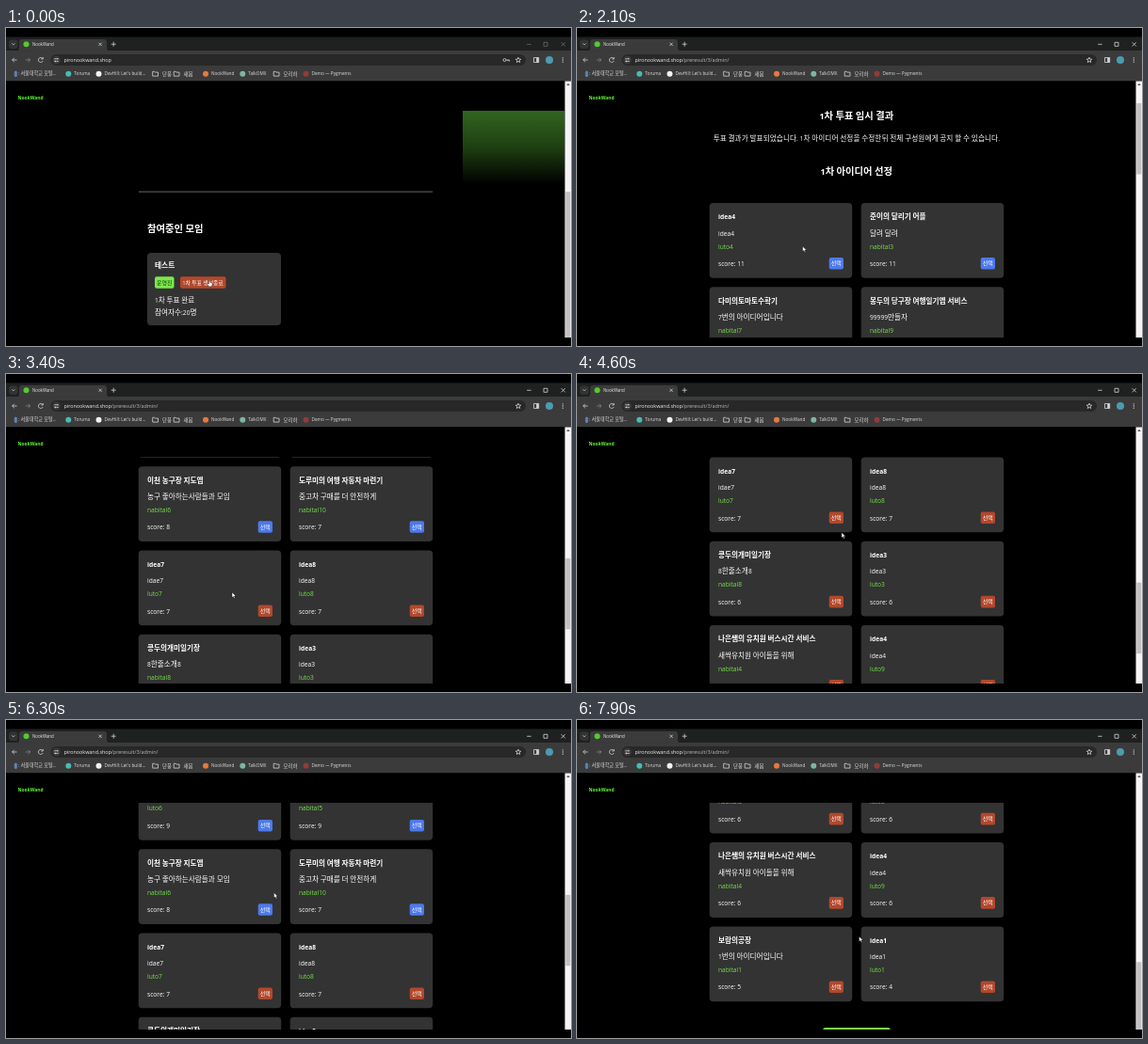
These frames come from a looping animation (600 px wide and 338 px high, 8 s). An HTML page:

```html
<!DOCTYPE html>
<html lang="ko">
<head>
<meta charset="utf-8">
<style>
html, body { margin: 0; height: 100%; overflow: hidden; background: #000; }
svg { display: block; width: 100vw; height: 100vh; font-family: "Open Sans", "Noto Sans CJK KR", "Noto Sans CJK", sans-serif; font-weight: 500; }
.line { fill: none; stroke: #d4d4d4; stroke-width: .8; }
</style>
</head>
<body>
<svg id="stage" viewBox="0 0 600 338">
  <defs>
    <linearGradient id="glow" x2="0" y2="1">
      <stop stop-color="#32651f"/><stop offset=".5" stop-color="#1e3f11"/><stop offset="1" stop-color="#000"/>
    </linearGradient>
    <clipPath id="view"><path d="M0 88H593V329H0z"/></clipPath>
    <clipPath id="bar"><path d="M593 56.5H600V329H593z"/></clipPath>
  </defs>
  <rect width="600" height="338"/>
  <g clip-path="url(#view)"><g id="home"></g><g id="result"></g></g>
  <g id="chrome"></g>
  <g clip-path="url(#bar)">
    <path fill="#f4f4f4" d="M593.5 56H600V329H593.5z"/>
    <path fill="#555" d="M595.2 61L597 58.8L598.8 61z"/>
    <rect id="thumb" x="594.3" width="5" fill="#c1c1c1"/>
  </g>
  <path id="arrow" d="M0 0V5.6L1.4 4.4L2.4 6.6L3.3 6.2L2.4 4.1H4.1z" fill="#fff" stroke="#000" stroke-width=".4"/>
  <path id="hand" d="M-.6 0Q0-.8.6 0V2.2L3 2.8V5Q2.6 6.6 1.8 6.8H-.8L-2.4 4Q-2 3.2-.6 4z" fill="#fff" stroke="#000" stroke-width=".4"/>
</svg>
<script>
const $ = id => document.getElementById(id);
const GREEN = '#7be84b', BLUE = '#4d79ea', RED = '#b2482c';
const BOLD = 'font-weight="700"', MID = 'text-anchor="middle"', HEAD = `${BOLD} ${MID}`;

const rect = (x, y, w, h, fill, r = 0) =>
  `<rect x="${x}" y="${y}" width="${w}" height="${h}" rx="${r}" fill="${fill}"/>`;
const dot = (x, y, r, fill) => `<circle cx="${x}" cy="${y}" r="${r}" fill="${fill}"/>`;
const line = d => `<path class="line" d="${d}"/>`;

// y is the vertical middle; Hangul is set a little larger than Latin
function text(x, y, str, size = 6.65, fill = '#fff', attrs = '') {
  const body = str.replace(/[가-힣]+/g, m => `<tspan font-size="${size * 1.15}">${m}</tspan>`);
  return `<text x="${x}" y="${y + size * .36}" font-size="${size}" fill="${fill}" ${attrs}>${body}</text>`;
}

// Landing page
$('home').innerHTML =
  rect(485, 88, 108, 78, 'url(#glow)') +
  rect(141, 173.6, 312, .9, '#777') +
  text(150, 214, '참여중인 모임', 9, '#fff', BOLD) +
  rect(150, 239, 142, 77, '#333', 4) +
  text(158, 252.9, '테스트', 6.7, '#fff', BOLD) +
  rect(158, 264.3, 20.5, 12.4, GREEN, 2) + text(168.2, 270.7, '운영진', 5.2, '#143008', MID) +
  rect(185, 264.3, 48.5, 12.4, RED, 2) + text(209.2, 270.7, '1차 투표 생성종료', 5.1, '#fff', MID) +
  text(158, 289.8, '1차 투표 완료') +
  text(158, 302.8, '참여자수:20명');

// Result page: title, description, user, score
const ideas = [
  ['idea4', 'idea4', 'luto4', 11], ['준이의 달리기 어플', '달려 달려', 'nabital3', 11],
  ['다미의토마토수확기', '7번의 아이디어입니다', 'nabital7', 10], ['봉두의 당구장 여행일기앱 서비스', '99999만들자', 'nabital9', 10],
  ['idea2', 'idea2', 'luto2', 9], ['idea5', 'idea5', 'luto5', 9],
  ['idea6', 'idea6', 'luto6', 9], ['원장쌤의 옷장', '데일리 옷 서비스', 'nabital5', 9],
  ['이천 농구장 지도앱', '농구 좋아하는사람들과 모임', 'nabital6', 8], ['도루미의 여행 자동차 마련기', '중고차 구매를 더 안전하게', 'nabital10', 7],
  ['idea7', 'idae7', 'luto7', 7], ['idea8', 'idea8', 'luto8', 7],
  ['콩두의개미일기장', '8한줄소개8', 'nabital8', 6], ['idea3', 'idea3', 'luto3', 6],
  ['나은쌤의 유치원 버스시간 서비스', '새싹유치원 아이들을 위해', 'nabital4', 6], ['idea4', 'idea4', 'luto9', 6],
  ['보람의공장', '1번의 아이디어입니다', 'nabital1', 5], ['idea1', 'idea1', 'luto1', 4]
];
const card = ([title, desc, user, score], i) => {
  const x = i % 2 ? 301.7 : 140.7, y = 255 + (i >> 1) * 89.3, left = x + 9.3;
  return rect(x, y, 151.5, 79.8, '#333', 4) +
    text(left, y + 15, title, 6.65, '#fff', BOLD) +
    text(left, y + 32.2, desc) +
    text(left, y + 46.2, user, 6.65, '#74df48') +
    text(left, y + 64.7, 'score: ' + score) +
    rect(x + 127, y + 58, 15.3, 12.6, i < 10 ? BLUE : RED, 2) +
    text(x + 134.6, y + 64.5, '선택', 5.2, '#fff', MID);
};
$('result').innerHTML =
  text(296.8, 162.5, '1차 투표 임시 결과', 9, '#fff', HEAD) +
  text(296.8, 186.8, '투표 결과가 발표되었습니다. 1차 아이디어 선정을 수정한뒤 전체 구성원에게 공지 할 수 있습니다.', 6.7, '#fff', MID) +
  text(296.8, 221.8, '1차 아이디어 선정', 9, '#fff', HEAD) +
  ideas.map(card).join('') +
  rect(261, 1077, 72, 16, GREEN, 3);

// Browser frame
const mark = (x, label, fill) => dot(x, 48.7, 3, fill) + text(x + 6, 48.7, label, 4.7, '#ddd');
const folder = (x, label) => line(`M${x - 2.8} 46.3h2l.8.8h3v4h-5.8z`) + text(x + 7.6, 48.9, label, 4.7, '#ddd');
$('chrome').innerHTML =
  rect(0, 9.5, 600, 15.5, '#1f2020') + rect(0, 24, 600, 32.5, '#3b3b3b') +
  '<path fill="#3b3b3b" d="M12 24.5Q14 24 14 21V15Q14 12 17 12H104Q107 12 107 15V21Q107 24 109 24.5z"/>' +
  rect(3, 12.5, 9.5, 9.5, '#333', 3) + line('M6.3 16.4l1.5 1.5l1.5-1.5') +
  dot(21.5, 17.3, 3, '#54c931') + text(28, 17.7, 'NookWand', 4.4, '#eee') +
  line('M98.5 15.7l3.2 3.2m0-3.2l-3.2 3.2M111.7 17.2h5m-2.5-2.5v5') +
  `<g id="controls">${line('M553.2 17.3h4.4M571 15.3h4v4h-4zM589.6 15.2l4.2 4.2m0-4.2l-4.2 4.2')}</g>` +
  line('M11.5 34H6.6m2.2-2.2L6.6 34l2.2 2.2M39 32.6a2.5 2.5 0 1 0 .2 2.4M39.3 31v2h-2') +
  `<g opacity=".45">${line('M20.8 34h4.9m-2.2-2.2l2.2 2.2l-2.2 2.2')}</g>` +
  rect(47.5, 28, 504.5, 12, '#282828', 6) +
  dot(53.5, 34, 4.3, '#3b3b3b') + line('M51.2 32.8h2.2m1.6 0h.8M51.2 35.4h.8m1.6 0h2.2') +
  dot(54.3, 32.8, .8, '#d4d4d4') + dot(52.7, 35.4, .8, '#d4d4d4') +
  `<text x="61.5" y="36.1" font-size="5.4" fill="#eee">pironookwand.shop<tspan id="path" fill="#bbb">/preresult/3/admin/</tspan></text>` +
  `<g id="key">${line('M528 34a1.5 1.5 0 1 0 3 0a1.5 1.5 0 1 0-3 0M531 34h3.5v1.5m-1.5-1.5v1.2')}</g>` +
  line('M544 31.2l.8 1.9l2 .1l-1.6 1.3l.5 2l-1.7-1.1l-1.7 1.1l.5-2l-1.6-1.3l2-.1z') +
  line('M560.5 31.5h5.2v5h-5.2z') + rect(563.2, 31.5, 2.5, 5, '#d4d4d4') +
  dot(577, 34, 4, '#4c9bb0') +
  [31.8, 34, 36.2].map(y => dot(591.3, y, .65, '#d4d4d4')).join('') +
  rect(8.8, 45.5, 3, 6.4, '#5b83b8', 1.5) + text(13, 48.8, ': 서울대학교 포털...', 4.5, '#ddd') +
  mark(66.3, 'Toruma', '#45bdb2') + mark(98.5, "DevHill: Let's build...", '#f2f2f2') +
  folder(158.5, '단풍') + folder(181, '새봄') +
  mark(212, 'NookWand', '#e8783d') + mark(251.3, 'TalkOMX', '#78b99f') +
  folder(287, '모리하') + mark(318.5, 'Demo — Pygments', '#923b3b') +
  rect(0, 56.5, 593.5, 31.5, '#000') +
  text(12.5, 74.4, 'NookWand', 4.95, '#62f536', BOLD);

// Eased value between [time, value] keys
function track(keys, t) {
  const i = keys.findIndex(k => k[0] > t);
  if (i < 0) return keys[keys.length - 1][1];
  if (!i) return keys[0][1];
  const [t0, a] = keys[i - 1], [t1, b] = keys[i];
  const p = (t - t0) / (t1 - t0);
  return a + (b - a) * p * p * (3 - 2 * p);
}
const scrollKeys = [[1600, 0], [2100, 69], [2250, 69], [3400, 514], [3800, 514], [4500, 613],
  [4800, 613], [5700, 358], [6300, 475], [6500, 475], [7800, 750]];
const cursorX = [[1000, 216], [1700, 239.5], [3500, 240], [4400, 281], [4800, 281], [5400, 284.5], [6500, 284.5], [7500, 299.5]];
const cursorY = [[1000, 268], [1700, 232], [3500, 232], [4400, 168.5], [4800, 168.5], [5400, 183.5], [6500, 183.5], [7500, 230]];
const show = (id, on) => $(id).setAttribute('visibility', on ? 'visible' : 'hidden');

function draw(now) {
  const t = Math.floor(now % 8000 / 100) * 100;
  const loaded = t >= 1200, scroll = track(scrollKeys, t);
  const place = `translate(${track(cursorX, t)} ${track(cursorY, t)})`;
  for (const id of ['result', 'path', 'arrow']) show(id, loaded);
  for (const id of ['home', 'key', 'hand']) show(id, !loaded);
  $('controls').setAttribute('opacity', t < 500 ? .4 : 1);
  $('result').setAttribute('transform', `translate(0 ${-scroll})`);
  $('arrow').setAttribute('transform', place);
  $('hand').setAttribute('transform', place);
  $('thumb').setAttribute('y', loaded ? 62 + scroll / 3.84 : 174);
  $('thumb').setAttribute('height', loaded ? 75.5 : 155);
  requestAnimationFrame(draw);
}
requestAnimationFrame(draw);
</script>
</body>
</html>
```
